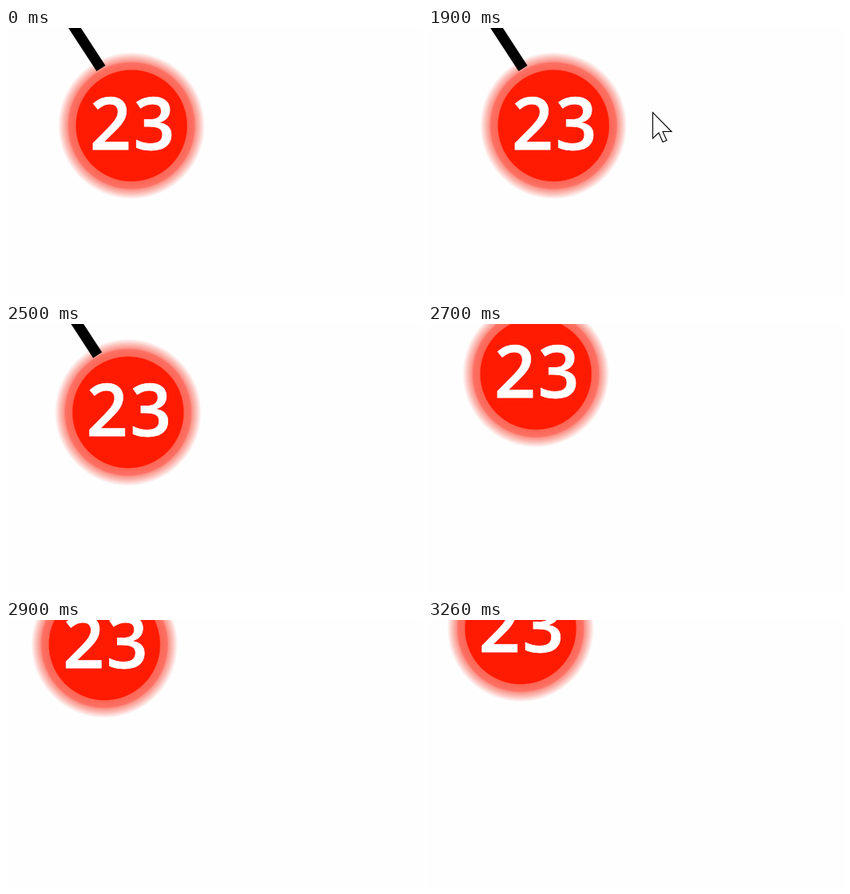
These frames come from a looping animation (521x335 px, 3300 ms). An HTML page:

```html
<!DOCTYPE html>
<html lang="en">
<head>
<meta charset="utf-8">
<title>Ball and pointer</title>
<style>
  html, body { margin: 0; width: 100%; height: 100%; overflow: hidden; background: #fefefe; }
  svg { display: block; width: 521px; height: 335px; }
  text { font: 600 91px "Open Sans", "Noto Sans", sans-serif; fill: #fff; stroke: #fff; stroke-width: .8px; }
  #ball { filter: blur(.7px); }
</style>
</head>
<body>
<svg viewBox="0 0 521 335">
  <defs>
    <radialGradient id="glow" gradientUnits="userSpaceOnUse" cx="157.2" cy="122.1" r="92">
      <stop offset=".75" stop-color="#ff1b02"/>
      <stop offset=".765" stop-color="#fc6656"/>
      <stop offset=".852" stop-color="#fc7164"/>
      <stop offset=".872" stop-color="#fb958b"/>
      <stop offset=".935" stop-color="#fcc6c0"/>
      <stop offset="1" stop-color="#fefefe"/>
    </radialGradient>
  </defs>
  <g id="ball">
    <circle cx="157.2" cy="122.1" r="92" fill="url(#glow)"/>
    <path d="M53-50.5L119 50.5" stroke="#000" stroke-width="13.2"/>
    <text y="151.8" x="105 159.5">23</text>
  </g>
  <path id="pointer" d="M-.5-.5V32L7 25L12 36.5L17 34.5L12 23.5H23Z"
        fill="#fff" stroke="#000" stroke-width="1.1"/>
</svg>
<script>
  const LOOP = 3300, TICK = 40;
  const SHOW = 1580, TURN = 2100, HIDE = 2340;   // pointer
  const LIFT = 2460, REST = 3260, HEIGHT = 111.5; // ball
  const ball = document.getElementById("ball");
  const pointer = document.getElementById("pointer");

  const clamp = u => Math.min(Math.max(u, 0), 1);
  const progress = (t, from, to) => clamp((t - from) / (to - from));
  const move = (el, x, y) => el.setAttribute("transform", `translate(${x} ${y})`);

  const bezier = (u, a, b, c, d) => {
    const v = 1 - u;
    return a * v ** 3 + 3 * b * v * v * u + 3 * c * v * u * u + d * u ** 3;
  };

  // A wide sweep right and back over the ball, then a dive to the lower left
  function pointerAt(t) {
    const u = progress(t, SHOW, TURN);
    if (u < 1) return [bezier(u, 150, 405, 303, 129), bezier(u, 182, 182, 69, 69)];
    const w = progress(t, TURN, HIDE - TICK);
    return [bezier(w, 129, 110, 79, 29), bezier(w, 69, 69, 60, 267)];
  }

  function draw(time) {
    const t = Math.floor((time + TICK / 2) / TICK) * TICK - TICK / 2;
    const rise = HEIGHT * (1 - (1 - progress(t, LIFT, REST)) ** 2.15);
    move(ball, -0.37 * rise, -rise);

    const shown = t >= SHOW && t < HIDE;
    pointer.style.display = shown ? "" : "none";
    if (shown) move(pointer, ...pointerAt(t).map(Math.round));
  }

  const start = performance.now();
  function frame() {
    draw((performance.now() - start) % LOOP);
    requestAnimationFrame(frame);
  }
  frame();
</script>
</body>
</html>
```
